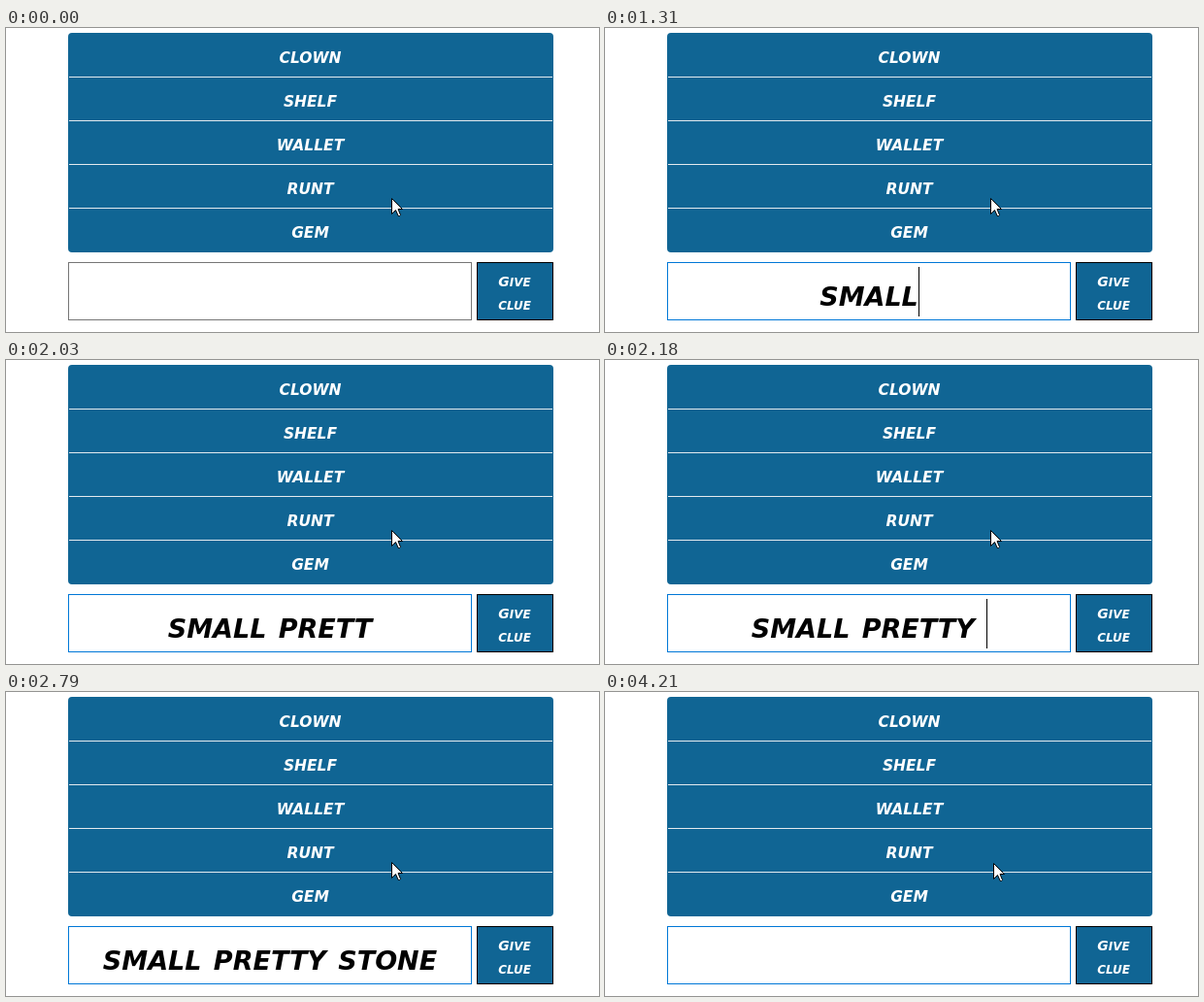
Animation of 611 by 313 pixels, one loop 4.28 s. Source, as an HTML page:

```html
<!DOCTYPE html>
<html lang="en">
<head>
<meta charset="utf-8">
<title>Clue entry</title>
<style>
html, body { margin: 0; width: 100%; height: 100%; overflow: hidden; background: #fff; }
svg { display: block; }
text { font: italic 700 15.5px "DejaVu Sans", "Open Sans", sans-serif; fill: #fff; text-anchor: middle; white-space: pre; }
#clue { font-size: 27px; fill: #000; word-spacing: 3px; }
.label { font-size: 12px; }
.big { font-size: 14px; }
</style>
</head>
<body>
<svg width="611" height="313" viewBox="0 0 611 313">
  <rect x="64" y="5" width="500" height="226" rx="4" fill="#106594"/>
  <g id="rows"></g>
  <rect id="field" x="64.5" y="241.5" width="415" height="59" fill="#fff"/>
  <text id="clue" x="272" y="286"></text>
  <rect id="caret" y="246" width="1" height="51"/>
  <rect x="485.5" y="241.5" width="78" height="59" fill="#106594" stroke="#000"/>
  <text class="label" x="524" y="266"><tspan class="big">G</tspan>IVE</text>
  <text class="label" x="524" y="290">CLUE</text>
  <path id="mouse" d="M.5 .5V16.5L4.5 12.5L7.2 18.5H8.5L9.5 17.5L7 11.5H11.5Z" fill="#fff" stroke="#000"/>
</svg>
<script>
const LOOP = 4280, FOCUS = 150, SEND = 3510, NUDGE = 4210, CENTER = 272;
const $ = id => document.getElementById(id);

// Typing bursts: start time, letters, ms per letter
const bursts = [
  [930, "SMALL", 75],
  [1480, " ", 75],
  [1630, "PRET", 75],
  [2030, "TY ", 75],
  [2260, "STONE", 50]
];
const blinks = [FOCUS, 700, 1250, 1780, 2180, 2790, 3340, 3890];

$("rows").innerHTML = ["CLOWN", "SHELF", "WALLET", "RUNT", "GEM"].map((word, i) =>
  (i ? `<rect x="65" y="${5 + 45 * i}" width="498" height="1" fill="#e4eaef"/>` : "") +
  `<text x="313.5" y="${36 + 45 * i}">${word}</text>`).join("");

function typed(t) {
  if (t >= SEND) return "";
  return bursts.map(([start, word, pace]) =>
    word.slice(0, Math.max(0, Math.floor((t - start) / pace) + 1))).join("");
}

function draw(t) {
  const clue = $("clue"), text = typed(t);
  if (clue.textContent !== text) clue.textContent = text;
  const half = text ? clue.getComputedTextLength() / 2 : 0;
  const shown = blinks.filter(b => b <= t).length % 2;
  $("caret").setAttribute("x", Math.round(CENTER + half));
  $("caret").setAttribute("visibility", shown ? "visible" : "hidden");
  $("field").setAttribute("stroke", t < FOCUS ? "#767676" : "#0078d7");
  $("mouse").setAttribute("transform", t < NUDGE ? "translate(397 175)" : "translate(400 176)");
}

const start = performance.now();
function tick() {
  draw((performance.now() - start) % LOOP);
  requestAnimationFrame(tick);
}
tick();
</script>
</body>
</html>
```
